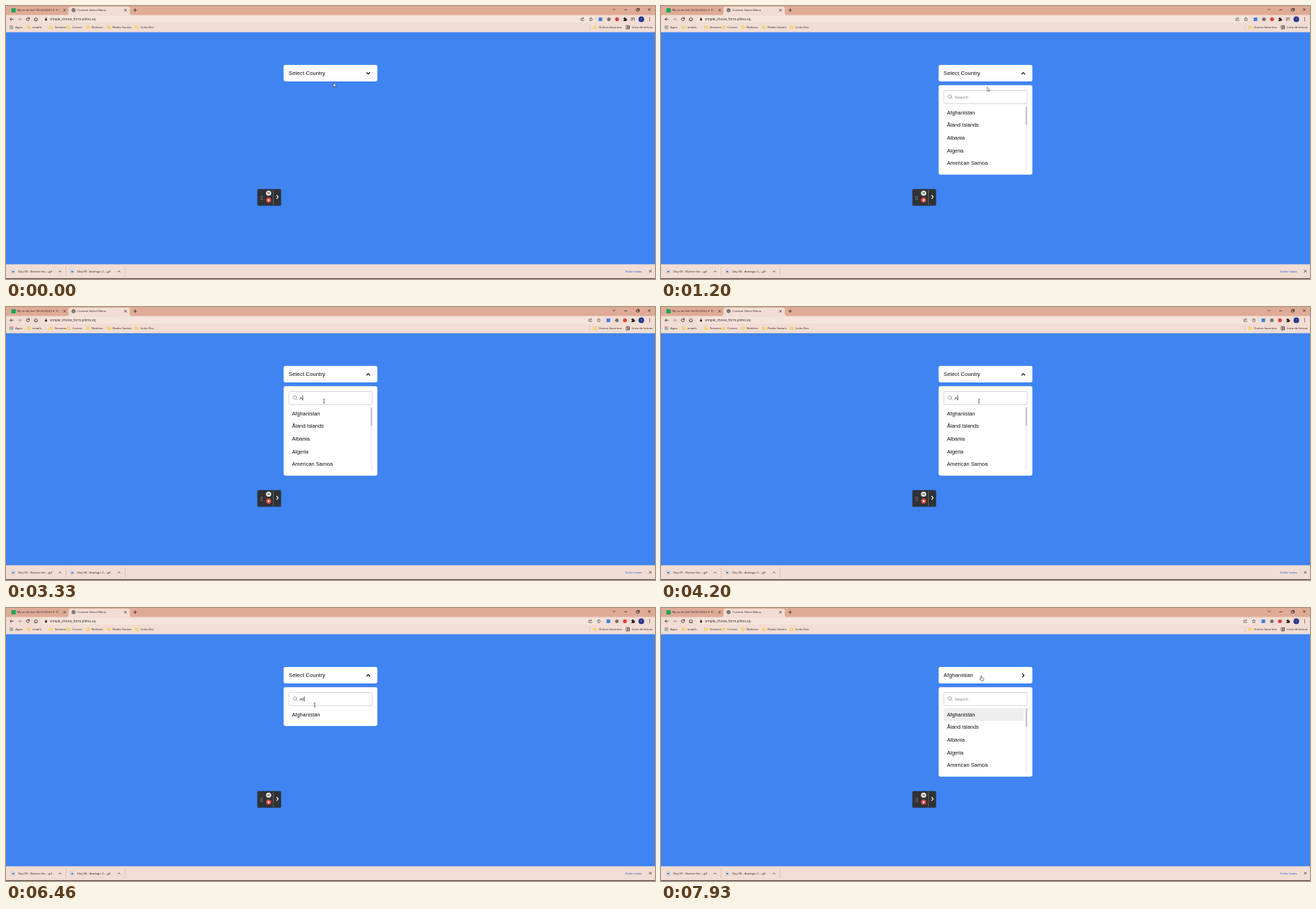
These frames come from a looping animation (902x380 px, 8000 ms). An HTML page:

```html
<!DOCTYPE html>
<html lang="pt">
<head>
<meta charset="utf-8">
<title>Custom Select Menu</title>
<style>
  html, body { margin: 0; width: 100%; height: 100%; overflow: hidden; background: #3f84f1; }
  svg { display: block; width: 902px; height: 380px; }
  text { white-space: pre; }
  .ui { font: 4.2px "Open Sans", "Noto Sans", sans-serif; fill: #2c2523; }
  .page { font: 21px "Liberation Sans", Arial, sans-serif; fill: #111; }
  .line { fill: none; stroke: #2c2523; stroke-width: .75; stroke-linecap: round; stroke-linejoin: round; }
</style>
</head>
<body>
<svg viewBox="0 0 902 380">
  <defs>
    <path id="close" class="line" d="M-1.4-1.4 1.4 1.4M1.4-1.4-1.4 1.4"/>
    <path id="up" class="line" d="M-1.5.7 0-.8 1.5.7"/>
    <path id="folder" d="M-2.2-2h1.8l.6.7h2V2h-4.4z" fill="#fbd76b" stroke="#e6b94c" stroke-width=".2"/>
    <g id="file">
      <path d="M-1.9-2.7h2.6l1.3 1.3v4.1h-3.9z" fill="#fff" stroke="#8b8582" stroke-width=".4"/>
      <rect x="-1.1" y="-.9" width="2.3" height="2.3" fill="#2f6fc4"/>
    </g>
  </defs>

  <rect width="902" height="380" fill="#3f84f1"/>

  <g class="ui">
    <rect width="902" height="14" fill="#dfab97"/>
    <path d="M84 12.5q3 0 3-3V3.5q0-2.5 2.5-2.5h80q2.500 0 2.500 2.500v6q0 3 3 3H902v24H0v-24z" fill="#f1ddd3"/>
    <rect x="7.500" y="3" width="6" height="6" rx=".8" fill="#18a558"/>
    <text x="15.500" y="7.300">My to do list! 02/22/2022 ✔ Fi</text>
    <rect x="76" y="2" width="3" height="8" fill="#dfab97" opacity=".8"/>
    <use href="#close" x="81.500" y="5.800"/>
    <circle cx="94" cy="5.800" r="2.700" fill="#5a5654"/>
    <path d="M92 5q1.400-.1 1.600.9t-.8 1.600M94.300 3.500q.3 1.300 1.800 1.200M94.700 7.800l.9-1.600" fill="none" stroke="#f1ddd3" stroke-width=".7"/>
    <text x="99.300" y="7.300">Custom Select Menu</text>
    <use href="#close" x="166" y="5.800"/>
    <path class="line" d="M177.500 5.800h4M179.500 3.800v4M843.600 4.200l1.500 1.500 1.500-1.500M859.700 5.300h3.400M876.500 4.200h2.800v2.800h-2.800zM877.500 4.200v-.9h2.700v2.800h-.9"/>
    <use href="#close" x="894" y="4.900"/>

    <rect id="omnibox" x="49.500" y="13.800" width="769" height="9.300" rx="4.600" fill="#f4e4dc"/>
    <path class="line" d="M10 18.400H5.800M7.600 16.500l-1.900 1.900 1.900 1.900"/>
    <path class="line" d="M17 18.400h4.200M19.300 16.500l1.900 1.900-1.900 1.900" style="stroke:#9a8a83"/>
    <path class="line" d="M32.100 17a2.100 2.100 0 1 0 .4 1.900M32.500 15.900v1.700h-1.700"/>
    <path class="line" d="M39 18.400l2.500-2.300 2.500 2.300M39.900 18v2.500h3.200V18"/>
    <rect x="54.200" y="17.700" width="2.800" height="2.600" rx=".3"/>
    <path class="line" d="M54.800 17.700v-.7a.8.8 0 0 1 1.600 0v.7" style="stroke-width:.5"/>
    <text x="61" y="20" font-size="4.700">simple_choice_form.plimo.xq</text>

    <g id="tools">
      <path class="line" d="M800.500 17h-1.500v3.300h4.200v-1M800.300 18.900q.2-2 2.500-2M801.900 15.900l1.100 1-1.100 1" style="stroke-width:.5"/>
      <path class="line" d="M813 16l.7 1.600 1.700.2-1.200 1.200.3 1.700-1.500-.8-1.500.8.3-1.700-1.200-1.200 1.700-.2z" style="stroke-width:.5"/>
      <rect x="823.700" y="15.900" width="5" height="5" rx=".6" fill="#3f7ee0"/>
      <circle cx="838" cy="18.400" r="2.500" fill="#77716e"/>
      <circle cx="849.200" cy="18.400" r="2.600" fill="#dc3f3c"/>
      <path d="M858 17h1.300a.9.900 0 1 1 1.700 0h1.200v1.300a.85.850 0 1 1 0 1.600v1.100h-4.200v-1.300a.8.800 0 1 0 0-1.400z" fill="#2c2523"/>
    </g>
    <path id="media" class="line" d="M869 16.700h3.800M869 18.300h2.600M869 19.900h1.600M873.300 17v2.800" style="stroke-width:.6"/>
    <circle cx="883" cy="18.400" r="3.900" fill="#26358c"/>
    <text x="883" y="19.800" font-size="3.800" text-anchor="middle" style="fill:#cfd4f4">T</text>
    <path d="M894.500 15.900v5" stroke="#2c2523" stroke-width="1" stroke-dasharray="1 1"/>

    <g id="apps"></g>
    <g id="bookmarks"></g>
    <path d="M811.500 26v7" stroke="#cdb8ad" stroke-width=".5"/>
    <path class="line" d="M862.300 27.300h4.200v4.600h-4.200zM864 27.300v4.600M864 28.800h2.500M864 30.400h2.500" style="stroke-width:.6"/>
    <text x="870" y="31.200">Lista de leitura</text>

    <rect y="359.500" width="902" height="21" fill="#f1ddd3"/>
    <rect y="378.900" width="902" height="1.100" fill="#54464a"/>
    <use href="#file" x="10" y="369.500"/>
    <text x="17" y="371.200">Day 09 - Button the....gif</text>
    <use href="#up" x="75" y="369.500"/>
    <use href="#file" x="92" y="369.500"/>
    <text x="99" y="371.200">Day 08 - Analogic C....gif</text>
    <use href="#up" x="157" y="369.500"/>
    <path d="M83.500 362.500v14M165.500 362.500v14" stroke="#cdb8ad" stroke-width=".6"/>
    <text x="861" y="370.700" style="fill:#2457c9">Exibir todos</text>
    <use href="#close" x="895.500" y="369.200"/>
  </g>

  <!-- page content in its own 2560-wide pixel space -->
  <g class="page" transform="scale(.35234)">
    <rect x="1095" y="233" width="370" height="65" rx="7" fill="#fff"/>
    <text id="choice" x="1115" y="273" font-size="22"></text>
    <path id="chevron" d="M-6-3 0 3 6-3" fill="none" stroke="#111" stroke-width="3.400" stroke-linecap="round" stroke-linejoin="round"/>
    <g id="menu">
      <rect id="panel" x="1095" y="313" width="370" rx="7" fill="#fff"/>
      <rect x="1115.500" y="333.500" width="329" height="52" rx="5" fill="#fff" stroke="#b3b3b3" stroke-width="1.600"/>
      <g fill="none" stroke="#777" stroke-width="1.800" stroke-linecap="round"><circle cx="1139" cy="357.500" r="6.500"/><path d="M1144 362.500l4.500 4.500"/></g>
      <text id="query" x="1158" y="365" font-size="17"></text>
      <rect id="caret" y="349" width="1.800" height="20" fill="#111"/>
      <rect id="highlight" x="1115" y="396" height="50" rx="5" fill="#eee"/>
      <text x="1128" y="428">Afghanistan</text>
      <g id="rest">
        <g id="others"></g>
        <rect x="1438" y="396" width="7" height="250" rx="3.500" fill="#f1f1f1"/>
        <rect x="1438" y="396" width="7" height="74" rx="3.500" fill="#c8c8c8"/>
      </g>
    </g>
  </g>

  <g>
    <rect x="348.900" y="254.500" width="33.800" height="24" rx="2" fill="#1d3f7c" opacity=".45"/>
    <rect x="349.600" y="255.100" width="32.500" height="22.600" rx="1.500" fill="#303134"/>
    <path d="M354.200 264.500v5.500M356.300 264.500v5.500" stroke="#c4c4c4" stroke-width=".9" stroke-dasharray=".9 1.300"/>
    <circle cx="365" cy="260.500" r="3.600" fill="#f2f2f2"/>
    <path d="M364.100 259v3M365.900 259v3" stroke="#444" stroke-width=".9"/>
    <circle cx="365" cy="270.200" r="3.600" fill="#e2483f"/>
    <rect x="363.800" y="269" width="2.400" height="2.400" rx=".4" fill="#fff"/>
    <path d="M371.500 256v21" stroke="#77787a" stroke-width=".7"/>
    <path d="M375.900 263.200l2.400 2.600-2.400 2.600" fill="none" stroke="#fff" stroke-width="1.100"/>
  </g>

  <g id="pointer" stroke-linejoin="round">
    <path id="arrow" d="M0 0v5.700l1.300-1.200.9 2 .9-.4-.9-1.900h1.800z" fill="#fff" stroke="#111" stroke-width=".45"/>
    <path id="hand" d="M-.6.200q.6-.6 1.200 0v2.400l2.300.5q.8.200.7 1l-.5 2.700h-3.300L-2.200 4.400q.2-.8 1-.4l.6.500z" fill="#fff" stroke="#111" stroke-width=".5"/>
    <path id="beam" d="M-1.200-2.900q1.200 0 1.200.6 0-.6 1.200-.6M0-2.300v4.600M-1.200 2.900q1.200 0 1.200-.6 0 .6 1.200.6" fill="none" stroke="#111" stroke-width=".6"/>
  </g>
</svg>
<script>
const $ = id => document.getElementById(id);
const show = (id, on) => $(id).style.display = on ? '' : 'none';
const setText = (id, value) => { if ($(id).textContent !== value) $(id).textContent = value; };

const bookmarks = [
  [31.5, 'emails'], [62.5, 'Streams'], [87, 'Cursos'], [113.8, 'Notícias'],
  [143, 'Redes Sociais'], [181.7, 'Links Dev'], [818.7, 'Outros favoritos']
];
$('bookmarks').innerHTML = '<text x="13" y="31.2">Apps</text>' + bookmarks.map(([x, name]) =>
  `<use href="#folder" x="${x}" y="29.600"/><text x="${x + 5.3}" y="31.200">${name}</text>`).join('');

const dotColors = ['#db4b3f', '#3f7ee0', '#35a05a'];
$('apps').innerHTML = Array.from({ length: 9 }, (_, i) =>
  `<rect x="${5.2 + i % 3 * 1.7}" y="${27.2 + (i / 3 | 0) * 1.7}" width="1.200" height="1.200" fill="${dotColors[i / 3 | 0]}"/>`).join('');

$('others').innerHTML = ['Åland Islands', 'Albania', 'Algeria', 'American Samoa'].map((name, i) =>
  `<text x="1128" y="${478 + i * 50}">${name}</text>`).join('');

const LOOP = 8000, BLINK = 530, TURN = 300;
const OPEN = 600, FOCUS = 1850, SHIFT = 2600, TYPE_A = 3100, TYPE_F = 4250, PICK = 7100, REOPEN = 7780;

// time, x, y of the pointer hotspot
const path = [
  [0, 455.2, 107], [350, 455.5, 98], [750, 455.5, 98], [1200, 453.2, 112.8],
  [1700, 444, 126], [2300, 444, 126], [2900, 442, 131], [4450, 442, 131],
  [4850, 428.8, 148.3], [5700, 428.8, 148.3], [6200, 429, 135], [6550, 429, 135],
  [6850, 428.8, 148.3], [7200, 428.8, 148.3], [7600, 445, 94.5], [LOOP, 445, 94.5]
];

function pointerAt(t) {
  const i = path.findIndex(p => p[0] > t);
  const [t0, x0, y0] = path[i - 1], [t1, x1, y1] = path[i];
  const k = (t - t0) / (t1 - t0), e = k * k * (3 - 2 * k);
  return [x0 + (x1 - x0) * e, y0 + (y1 - y0) * e];
}

const turned = (t, from) => Math.min(1, Math.max(0, (t - from) / TURN));

function draw(t) {
  const open = t >= OPEN && t < PICK || t >= REOPEN;
  const picked = t >= PICK;
  const query = picked || t < TYPE_A ? '' : t < TYPE_F ? 'A' : 'Af';
  const filtered = query === 'Af';
  const [x, y] = pointerAt(t);

  setText('choice', picked ? 'Afghanistan' : 'Select Country');
  const turn = turned(t, OPEN) - turned(t, PICK) + turned(t, REOPEN);
  $('chevron').setAttribute('transform', `translate(1429 266) rotate(${-180 * turn})`);

  show('menu', open);
  $('panel').setAttribute('height', filtered ? 153 : 353);
  show('rest', !filtered);
  setText('query', query || 'Search');
  $('query').style.fill = query ? '#222' : '#858585';

  const lastInput = t >= TYPE_F ? TYPE_F : t >= TYPE_A ? TYPE_A : FOCUS;
  show('caret', t >= FOCUS && !picked && (t - lastInput) % (2 * BLINK) < BLINK);
  $('caret').setAttribute('x', 1158 + [0, 12, 17][query.length]);

  const overItem = open && y > 139.5 && y < 157;
  show('highlight', overItem || picked);
  $('highlight').setAttribute('width', filtered ? 323 : 316);

  const overInput = open && y > 117.3 && y < 136.2;
  const overButton = y > 82 && y < 105;
  show('beam', overInput);
  show('hand', overItem || overButton);
  show('arrow', !overInput && !overItem && !overButton);
  $('pointer').setAttribute('transform', `translate(${x} ${y})`);

  const shifted = t >= SHIFT;
  show('media', !shifted);
  $('tools').setAttribute('transform', `translate(${shifted ? 11 : 0} 0)`);
  $('omnibox').setAttribute('width', shifted ? 780 : 769);
}

const start = performance.now();
function tick() {
  draw((performance.now() - start) % LOOP);
  requestAnimationFrame(tick);
}
tick();
</script>
</body>
</html>
```
